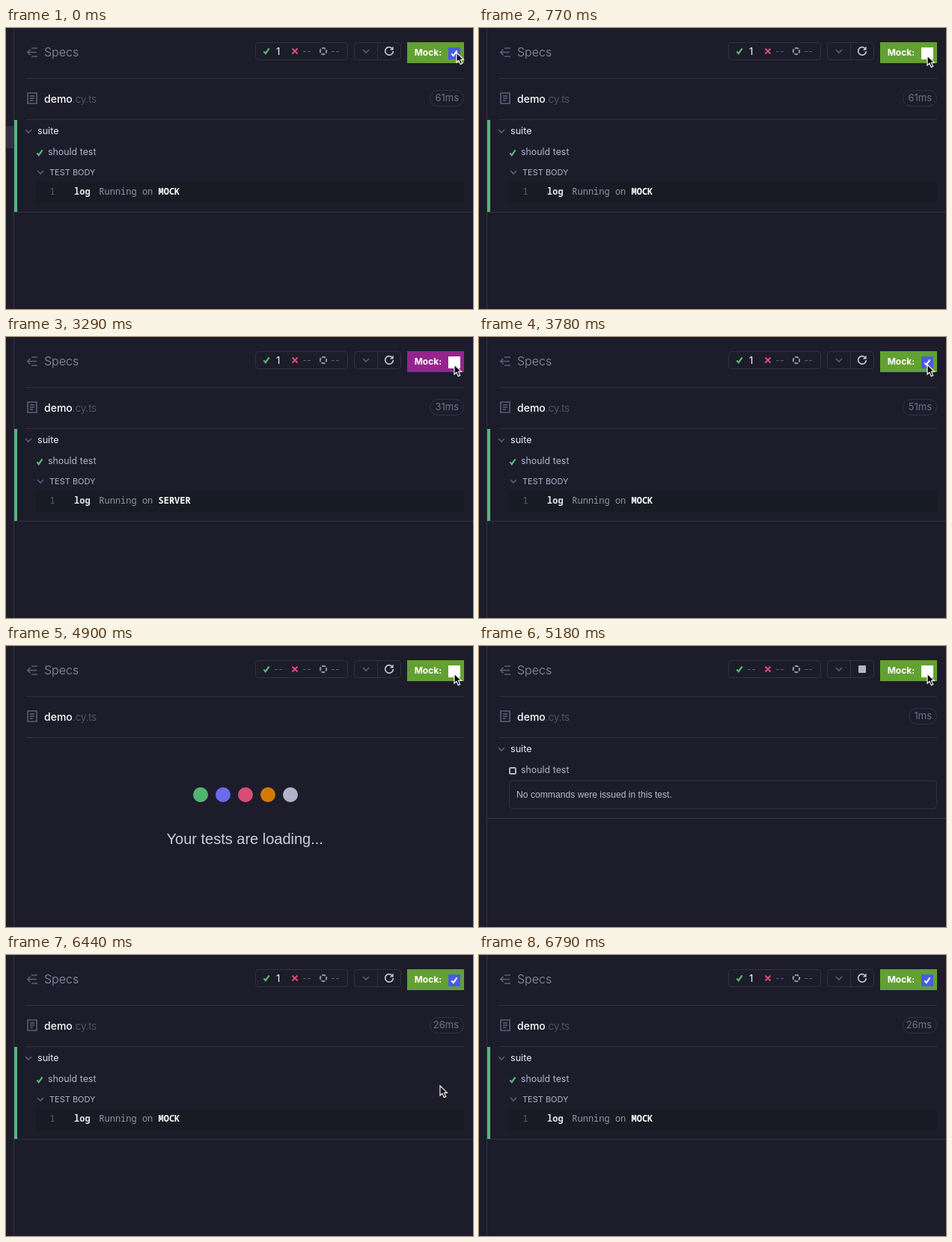
Write an HTML page that moves like this. It is 624 px wide and 376 px high and loops after 6.86 s.

```html
<!DOCTYPE html>
<html lang="en">
<head>
<meta charset="utf-8">
<title>Test runner</title>
<style>
  html, body { margin: 0; width: 100%; height: 100%; overflow: hidden; background: #1d1c2a; }
  svg { display: block; width: 624px; height: 376px; }
  text { font-family: Inter, sans-serif; font-size: 13px; fill: #9095ad; }
  .mono { font-family: "Noto Sans Mono", monospace; font-size: 12px; }
  .sans { font-family: "Liberation Sans", Arial, sans-serif; }
  .white { fill: #fff; }
  .dim { fill: #5a5f7a; }
  .line { fill: none; stroke: #2f3145; }
  .icon { fill: none; stroke: #5a5f7a; stroke-width: 1.6; }
  .tick { fill: none; stroke: #56b97c; stroke-width: 2.2; }
  .hidden { display: none; }
</style>
</head>
<body>
<svg viewBox="0 0 624 376">
  <defs>
    <path id="chevron" d="M-4-2 0 2 4-2"/>
    <path id="tick" d="M-3.6.4-1.2 3.2 3.6-3.6"/>
  </defs>
  <rect width="624" height="376" fill="#1d1c2a"/>
  <rect id="sidebar" y="131" width="10" height="30" fill="#303143"/>
  <path class="line" d="M10.5 0V376M27 67.5H612M27 122.5H612"/>

  <!-- header -->
  <path class="icon" d="M34 27H42M29 32.5H41M34 38H42M32.5 28.8 28.8 32.5 32.5 36.2"/>
  <text x="51" y="38" style="font-size:16px;font-weight:300">Specs</text>

  <rect class="line" x="333.5" y="19.5" width="123" height="23" rx="4"/>
  <use href="#tick" class="tick" x="348" y="31"/>
  <text id="passed" x="361" y="35.5"></text>
  <path d="M382.5 27.5 389.5 34.5M389.5 27.5 382.5 34.5" stroke="#dc4c74" stroke-width="2"/>
  <path class="icon" d="M397 31.5H401M403 31.5H407M435 31.5H439M441 31.5H445" style="stroke-width:1.2"/>
  <path id="noPass" class="icon" d="M359 31.5H363M365 31.5H369" style="stroke-width:1.2"/>
  <circle cx="424" cy="31" r="4.2" fill="none" stroke="#9095ad" stroke-width="2" stroke-dasharray="5.1 1.5" stroke-dashoffset="2.5"/>

  <rect class="line" x="465.5" y="19.5" width="62" height="23" rx="4"/>
  <path class="line" d="M496.5 19.5V42.5"/>
  <use href="#chevron" class="icon" x="481" y="31"/>
  <g id="reload">
    <path d="M515.5 26.9A5.3 5.3 0 1 0 517.3 31" fill="none" stroke="#c3c6d8" stroke-width="1.7"/>
    <path d="M517.6 24.5V29.4H512.8Z" fill="#c3c6d8"/>
  </g>
  <rect id="stop" x="507" y="26" width="10" height="10" rx="1" fill="#b3b6c9"/>

  <rect id="button" x="536" y="19" width="76" height="28"/>
  <text class="white" x="545.7" y="37" style="font-size:12px;font-weight:700">Mock:</text>
  <rect id="box" x="591" y="26" width="16" height="16"/>
  <use id="boxTick" href="#tick" x="599" y="34" fill="none" stroke="#fff" stroke-width="2"/>

  <!-- spec file -->
  <path class="icon" d="M29 87H41V101H29ZM32 91H38M32 94H38M32 97H36"/>
  <text class="white" x="51" y="100" style="font-size:14px;font-weight:500">demo<tspan class="dim" style="font-weight:300;letter-spacing:-.3px">.cy.ts</tspan></text>
  <g id="pill">
    <rect id="pillBorder" class="line" y="83.5" height="21" rx="10.5"/>
    <text id="duration" x="605" y="98" text-anchor="end" style="fill:#6c718b"></text>
  </g>

  <!-- suite -->
  <g id="suite">
    <use href="#chevron" class="icon" x="30" y="138"/>
    <text x="42" y="142" style="font-size:12.6px;fill:#eceef6">suite</text>
    <text x="56" y="170" style="font-size:12.4px;fill:#afb3c7">should test</text>
  </g>
  <g id="done">
    <rect x="11" y="123" width="4" height="123" fill="#59b37c"/>
    <path class="line" d="M11 246.5H624"/>
    <use href="#tick" class="tick" x="45" y="167"/>
    <use href="#chevron" class="icon" x="46" y="193"/>
    <text x="58" y="197" style="font-size:11px;fill:#afb3c7">TEST BODY</text>
    <rect x="40" y="206" width="572" height="28" fill="#171b23"/>
    <text class="mono dim" x="58.5" y="223">1</text>
    <text class="mono" x="91" y="223" style="font-weight:600;fill:#e1e3ed">log</text>
    <text class="mono" x="124.3" y="223">Running on</text>
    <text id="target" class="mono white" x="203.5" y="223" style="font-weight:600"></text>
  </g>
  <g id="running">
    <rect x="41" y="163" width="8" height="8" rx="1.5" fill="none" stroke="#b3b6c9" stroke-width="2"/>
    <rect class="line" x="40.5" y="180.5" width="571" height="37" rx="4"/>
    <text class="sans" x="50" y="203" style="font-size:12.15px;fill:#b9bccd">No commands were issued in this test.</text>
    <path class="line" d="M11 230.5H624"/>
  </g>
  <g id="loading">
    <circle cx="260" cy="199" r="10" fill="#51b371"/>
    <circle cx="290" cy="199" r="10" fill="#6b6bee"/>
    <circle cx="320" cy="199" r="10" fill="#d94c74"/>
    <circle cx="350" cy="199" r="10" fill="#d07b00"/>
    <circle cx="380" cy="199" r="10" fill="#b0b4c8"/>
    <text class="sans" x="214.5" y="265" style="font-size:20px;fill:#cbcddd">Your tests are loading...</text>
  </g>

  <path id="cursor" d="M0 0V13L3 10.3 5.3 15.5 7.7 14.5 5.5 9.4H9.5Z" fill="#000" stroke="#fff" stroke-width="1.2"/>
</svg>
<script>
const LOOP = 6860, TICK = 70;
const $ = id => document.getElementById(id);
const show = (id, on) => $(id).classList.toggle('hidden', !on);

// Each run: click, loading, running and finished times, with its outcome.
const runs = [
  { click: -1, load: -1, run: -1, end: 0, mock: true, ms: 61 },
  { click: 770, load: 840, run: 980, end: 1050, mock: false, ms: 31 },
  { click: 3430, load: 3500, run: 3710, end: 3780, mock: true, ms: 51 },
  { click: 4830, load: 4900, run: 5180, end: 5250, mock: false, ms: 29 },
  { click: 5880, load: 5950, run: 6230, end: 6300, mock: true, ms: 26 }
];

// Pointer stops: time, x, y.
const path = [
  [0, 602, 33], [140, 601, 34], [210, 601, 34], [350, 600.5, 37],
  [420, 600.5, 37], [630, 599, 37], [6300, 599, 37], [6370, 597, 62],
  [6440, 580, 175], [6510, 543, 327], [6580, 475, 343], [6720, 315, 366],
  [6790, 270, 400]
];

function pointer(t) {
  const i = path.findIndex(p => p[0] > t);
  if (i < 0) return path[path.length - 1].slice(1);
  const [a, b] = [path[i - 1], path[i]];
  const k = (t - a[0]) / (b[0] - a[0]);
  return [1, 2].map(n => a[n] + (b[n] - a[n]) * k);
}

function draw(now) {
  const t = Math.floor(now % LOOP / TICK) * TICK;
  const current = runs.filter(r => r.click <= t).pop();
  const result = runs.filter(r => r.end <= t).pop();
  const phase = t >= current.end || t < current.load ? 'done'
    : t >= current.run ? 'running' : 'loading';

  for (const id of ['done', 'running', 'loading']) show(id, id === phase);
  show('sidebar', t < 770);
  show('suite', phase !== 'loading');
  show('pill', phase !== 'loading');
  show('noPass', phase !== 'done');
  show('stop', phase === 'running');
  show('reload', phase !== 'running');
  show('boxTick', current.mock);

  $('passed').textContent = phase === 'done' ? '1' : '';
  $('passed').style.fill = '#fff';
  $('box').setAttribute('fill', current.mock ? '#4a5be2' : '#fff');
  $('button').setAttribute('fill', result.mock ? '#62a032' : '#95248e');
  $('target').textContent = result.mock ? 'MOCK' : 'SERVER';

  const label = (phase === 'running' ? 1 : result.ms) + 'ms';
  const width = 13 + 8 * label.length;
  $('duration').textContent = label;
  $('pillBorder').setAttribute('x', 611.5 - width);
  $('pillBorder').setAttribute('width', width);
  $('cursor').setAttribute('transform', `translate(${pointer(t)})`);
}

const start = performance.now();
function frame() {
  draw(performance.now() - start);
  requestAnimationFrame(frame);
}
frame();
</script>
</body>
</html>
```
